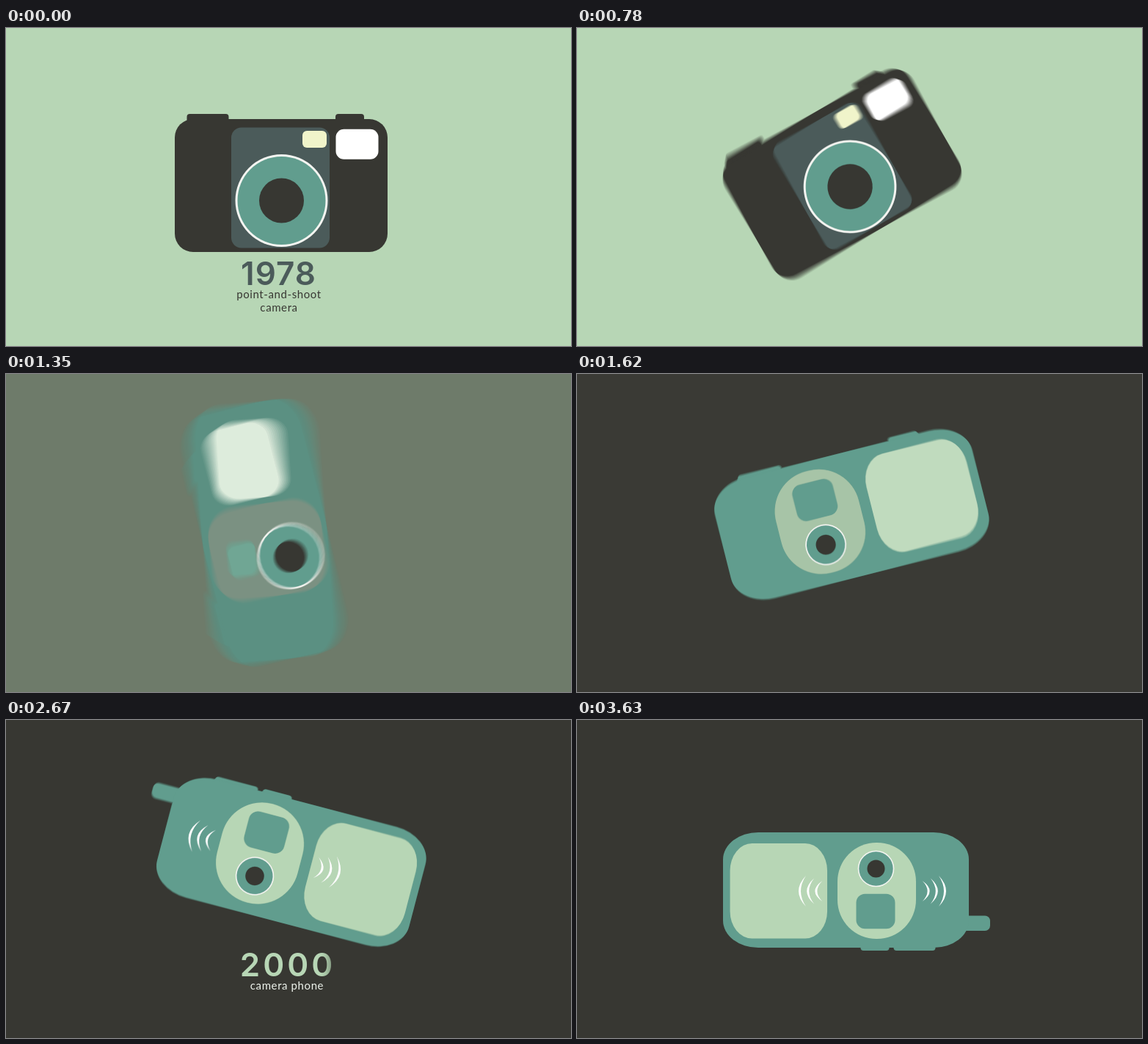
These frames come from a looping animation (770x433 px, 3660 ms). An HTML page with a canvas:

```html
<!DOCTYPE html>
<html lang="en">
<head>
<meta charset="utf-8">
<title>Camera history</title>
<style>
  html, body { margin: 0; width: 100%; height: 100%; overflow: hidden; background: #b7d6b5; }
  canvas { display: block; }
</style>
</head>
<body>
<canvas id="stage" width="770" height="433"></canvas>
<script>
const LOOP = 3660, STEP = 30, SHUTTER = 20, SAMPLES = 12;
const W = 770, H = 433;
const DARK = [55, 55, 50], MINT = [183, 214, 181], TEAL = [97, 157, 142],
      SLATE = [75, 91, 90], CREAM = [240, 244, 202], WHITE = [255, 255, 255];

const screen = document.getElementById('stage').getContext('2d');
const layer = document.createElement('canvas');
layer.width = W;
layer.height = H;
const c = layer.getContext('2d');

const mix = (a, b, k) => a + (b - a) * k;
const rgb = (a, b = a, k = 0) => `rgb(${a.map((v, i) => Math.round(mix(v, b[i], k)))})`;

// Sine ease from 0 to 1 between two times; a power above 1 delays the start
function ease(t, from, to, power = 1) {
  const x = Math.min(1, Math.max(0, (t - from) / (to - from)));
  return (1 - Math.cos(Math.PI * x ** power)) / 2;
}

// Each spin winds up the other way first; the first one drifts into place
function spin(t) {
  const first = -40 * ease(t, 240, 670) + 387 * ease(t, 680, 1655) + 13 * ease(t, 1600, 2200);
  const second = 19 * ease(t, 2180, 2480) - 199 * ease(t, 2400, 3610, 1.58);
  return (first + second) * Math.PI / 180;
}

const centreX = t => 375 - 5 * ease(t, 500, 1110) + 10 * ease(t, 1110, 1620)
  + 3 * ease(t, 2200, 2670) - 16.5 * ease(t, 2850, 3610);
const centreY = t => 237.5 - 28 * ease(t, 240, 1110) + 4 * ease(t, 1110, 1620)
  + 2.5 * ease(t, 2200, 2670) - 7.5 * ease(t, 2670, 3300);
const zoom = t => 1 + 0.08 * ease(t, 600, 1620) - 0.02 * ease(t, 1700, 2300) - 0.06 * ease(t, 2700, 3610);

// Rounded box from [centre x, centre y, width, height, rx, ry]
function box([x, y, w, h, rx, ry = rx], fill) {
  c.fillStyle = fill;
  c.beginPath();
  c.roundRect(x - w / 2, y - h / 2, w, h, { x: rx, y: ry });
  c.fill();
}

function disc(x, y, r, fill) {
  c.fillStyle = fill;
  c.beginPath();
  c.arc(x, y, r, 0, 7);
  c.fill();
}

function crescent(x, half, side) {
  const tip = x - 10 * side, y = -1.5;
  c.beginPath();
  c.moveTo(tip, y - half);
  c.quadraticCurveTo(x + 10 * side, y, tip, y + half);
  c.quadraticCurveTo(x + 4 * side, y, tip, y - half);
  c.fill();
}

function soundWaves(opacity) {
  c.globalAlpha = opacity;
  c.fillStyle = '#fff';
  for (let i = 0; i < 3; i++) {
    const shift = i * 11.2, half = 21 - i * 3.5;
    crescent(64.5 - shift, half, 1);
    crescent(-136.5 + shift, half, -1);
  }
}

function caption(x, baseline, year, lines, yearFill, lineFill, spacing) {
  c.textAlign = 'center';
  c.font = '600 44px Inter, sans-serif';
  c.letterSpacing = spacing + 'px';
  c.fillStyle = yearFill;
  c.fillText(year, x + spacing / 2, baseline);
  c.font = '15px Lato, sans-serif';
  c.letterSpacing = '0.6px';
  c.fillStyle = lineFill;
  lines.forEach((line, i) => c.fillText(line, x + 1, baseline + 18 + i * 18));
}

// Colour that fades out towards an edge on the right
function wiped(color, edge) {
  const g = c.createLinearGradient(edge - 28, 0, edge, 0);
  g.addColorStop(0, `rgb(${color})`);
  g.addColorStop(1, `rgba(${color}, 0)`);
  return g;
}

function drawCaptions(t) {
  if (t < 480) {
    const x = 371 - 440 * ease(t, 0, 465);
    caption(x, 350, '1978', ['point-and-shoot', 'camera'], rgb(SLATE), rgb(DARK), 1);
  } else if (t > 1640 && t < 2970) {
    const slide = 470 * (1 - ease(t, 1640, 2140));
    const edge = 510 + slide - 210 * ease(t, 2530, 2970);
    caption(382 + slide, 349, '2000', ['camera phone'], wiped(MINT, edge), wiped([238, 243, 236], edge), 4);
  }
}

// Positions lead the change of shape, sizes follow, colours come last
function drawCamera(t) {
  const lead = ease(t, 825, 1500), grow = ease(t, 950, 1700), tone = ease(t, 900, 1850);
  const extras = ease(t, 1640, 2000);
  const blend = (a, b, move, size) => a.map((v, i) => mix(v, b[i], i < 2 ? move : size));
  const body = rgb(DARK, TEAL, lead);

  c.save();
  c.translate(centreX(t), centreY(t));
  c.rotate(spin(t));
  c.translate(0, -23);
  c.scale(zoom(t), zoom(t));

  const top = mix(-90, -75, lead);
  box([mix(-100, -93.5, extras), top, 57, 15, 4], body);
  box([mix(93.5 - 7 * lead, -39.5, extras), top, 39, 15, 4], body);
  if (extras > 0) box([mix(-128, -168, extras), -45.2, 57, 20.5, 7], body);
  box(blend([0, 0, 290, 181, 25, 25], [0, 0, 335, 157, 48, 37], lead, lead), body);

  box(blend([-1, 3, 134, 164, 14, 14], [-42, -1, 107, 131, 53, 53], grow, grow), rgb(SLATE, MINT, tone));
  box(blend([45.5, -63, 33, 23, 6, 6], [-40.5, -29, 53, 47.5, 12, 12], lead, grow), rgb(CREAM, TEAL, lead));
  box(blend([103.5, -56.2, 58, 41, 11, 11], [91.7, -1.3, 132.5, 129.5, 30, 37], lead, grow), rgb(WHITE, MINT, tone));

  const [x, y, outer, inner, hole] = blend([0.5, 20.5, 63, 60, 30.5], [-41, 29, 24.8, 23.2, 12], lead, grow);
  disc(x, y, outer, '#f4f5f1');
  disc(x, y, inner, rgb(TEAL));
  disc(x, y, hole, rgb(DARK));

  soundWaves(ease(t, 1850, 2100));
  c.restore();
}

function drawScene(t) {
  c.fillStyle = rgb(MINT, DARK, ease(t, 950, 1700));
  c.fillRect(0, 0, W, H);
  drawCaptions(t);
  drawCamera(t);
}

// Averages several moments within the shutter for motion blur
function render(time) {
  const t = Math.floor(time % LOOP / STEP) * STEP;
  for (let i = 0; i < SAMPLES; i++) {
    const moment = t + (i / (SAMPLES - 1) - 0.5) * SHUTTER;
    drawScene(t ? moment : 0);
    screen.globalAlpha = 1 / (i + 1);
    screen.drawImage(layer, 0, 0);
  }
}

const start = performance.now();
function tick() {
  render(performance.now() - start);
  requestAnimationFrame(tick);
}
tick();
</script>
</body>
</html>
```
